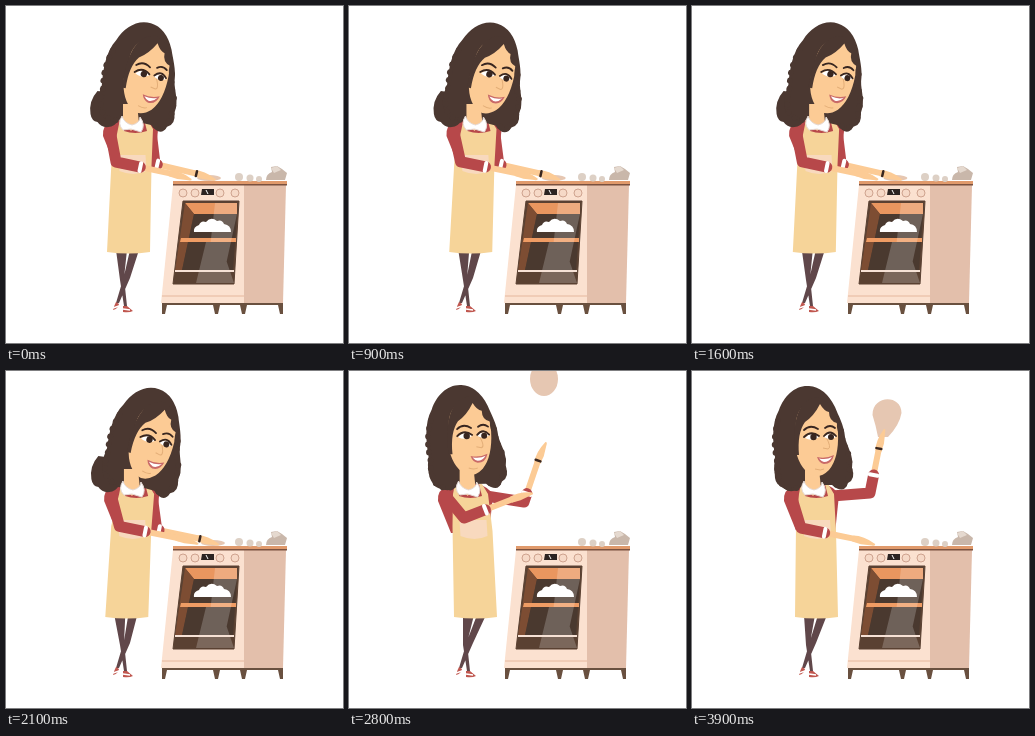
Recreate the animation shown at these times as an HTML page. Size 337x337 px, loop 4 s.

```html
<!DOCTYPE html>
<html lang="en">
<head>
<meta charset="utf-8">
<title>Baker</title>
<style>
  html, body { margin: 0; width: 100%; height: 100%; overflow: hidden; background: #fff; }
  svg { display: block; width: 100vw; height: 100vh; }
  .line { fill: none; stroke-linecap: round; stroke-linejoin: round; }
  .hair { fill: #4b3831; }
  .curl { fill: none; stroke: #4b3831; stroke-width: 6; stroke-linecap: round; stroke-dasharray: 0 8; }
  .skin { fill: #fccb95; }
  .red { fill: #b7484a; }
</style>
</head>
<body>
<svg viewBox="0 0 337 337">
  <g id="oven">
    <path fill="#69503f" d="M156 296H277V308H274L272 299H241L239 308H236L234 299H214L212 308H209L207 299H161L159 308H156Z"/>
    <path fill="#fbe1d0" d="M167 179H238V297H155Z"/>
    <path fill="#e3bfab" d="M238 179H280L277 297H238Z"/>
    <path fill="#e09a6c" d="M167 175H281V178.5H167Z"/>
    <path fill="#7a513f" d="M167 178H281V179.5H167Z"/>
    <path stroke="#e5b79d" d="M156 290H238"/>
    <g fill="#f6d9c7" stroke="#cfa38f">
      <circle cx="177" cy="187" r="4"/><circle cx="189" cy="187" r="4"/>
      <circle cx="214" cy="187" r="4"/><circle cx="229" cy="187" r="4"/>
    </g>
    <path fill="#2c2422" d="M196 183H208V189H195Z"/>
    <path stroke="#fff" d="M200 184L202 188"/>
    <path fill="#5a4132" stroke="#5a4132" d="M177 195H233L228 278H167Z"/>
    <path fill="#e9965f" d="M179 197H231V208H188Z"/>
    <path fill="#7d4d33" d="M179 197L188 208L176 265H169Z"/>
    <path fill="#4a392f" d="M188 208H231L227 264H176Z"/>
    <path fill="#ef9c64" d="M175 232H230V236H174Z"/>
    <path fill="#fff" d="M188 226Q187 221 193 219Q195 214 200 216Q205 210 211 215Q216 213 218 218Q225 219 225 226Z"/>
    <path fill="#fff" opacity=".2" d="M200 236H214L228 277H190ZM209 197H231V208L216 277H200Z"/>
    <path stroke="#f6e1d5" stroke-width="2" d="M169 265H228"/>
    <g fill="#ddd0c5">
      <circle cx="233" cy="171" r="4"/><circle cx="244" cy="172" r="3.5"/><circle cx="253" cy="173" r="3"/>
      <path fill="#c9b7aa" d="M260 174Q260 168 266 166L265 161L271 160L276 163L281 167L279 174Z"/>
      <path fill="#e5d9cf" d="M265 162L271 160L275 164L268 167Z"/>
    </g>
  </g>

  <path id="legs" fill="#60474a"/>
  <path fill="#c0574f" d="M110 296L113 298Q112 303 107 304Q108 300 110 296ZM117 300H121L127 305Q123 307 117 306Z"/>
  <path stroke="#fff" stroke-width="1.5" d="M107 302L113 300M117 303L124 304"/>

  <path id="dough" fill="#e6c7b2"/>
  <g id="rightArm"></g>
  <g id="chest">
    <path class="red" d="M101 115Q91 119 92 130L105 162H143L147 124Q143 116 130 112Z"/>
  </g>
  <path id="apron" fill="#f6d499"/>
  <path id="pocket" fill="#f8d9be"/>
  <g id="leftArm"></g>

  <path id="lock" class="hair" d="M90 84Q81 94 83 107Q84 114 90 115Q94 121 101 120Q107 120 111 113L118 88Z"/>
  <g id="hair">
    <path class="hair" d="M117 15C103 14 92 25 87 39C79 53 81 72 83 86Q80 104 88 115Q99 124 111 114L140 114Q152 124 156 112Q164 108 160 97C162 84 155 76 153 66C152 54 146 44 143 36Q133 16 117 15Z"/>
    <path class="curl" d="M86 50Q80 70 85 88Q84 104 90 113Q98 120 108 116M149 60Q150 72 156 82Q160 100 154 112Q149 116 143 113"/>
  </g>
  <g id="collar">
    <path class="skin" d="M113 98H127L129 117L121 125L113 117Z"/>
    <path fill="#fff" stroke="#e6dad5" d="M112 110Q107 118 113 124L121 123L131 126Q136 119 130 111Q130 117 122 119Q114 117 112 110Z"/>
  </g>
  <g id="face">
    <path class="skin" d="M104 50Q107 30 127 30Q145 36 146 62Q147 87 137 99Q128 108 119 104Q106 96 103 75Z"/>
    <path fill="none" stroke="#e3ae78" d="M134 66Q140 77 136 78L131 77M123 98Q129 100 132 98"/>
    <path class="hair" d="M103 84Q98 28 126 26Q148 34 150 66Q144 60 145 52Q137 50 137 41Q132 40 128 33Q122 45 113 51Q105 62 107 84Z"/>
    <g fill="#fff">
      <path d="M113 67Q120 59 127 66Q120 71 113 67ZM132 66Q138 59 144 66Q138 70 132 66Z"/>
    </g>
    <g fill="#382620">
      <circle cx="121.5" cy="66" r="3.2"/><circle cx="139" cy="66" r="3"/>
    </g>
    <path class="line" stroke="#382620" stroke-width="1.8" d="M112 66Q119 59 127 65M132 65Q138 58 144 65M112 59Q118 53 126 58M133 57Q138 53 143 57"/>
    <path fill="#c96a68" d="M125 86Q134 88 142 84Q140 93 132 93Q127 92 125 86Z"/>
    <path fill="#fff" d="M127 87.5Q135 89 140 86Q137 91 132 91Q129 90 127 87.5Z"/>
  </g>
</svg>
<script>
const $ = id => document.getElementById(id);
const LOOP = 4000, STEP = 100, TAU = Math.PI * 2;

// head x, y, tilt | chest, hem | left elbow, hand | right elbow, hand | right cuff
const back   = [6, 1, 13,   5, -2,  110, 156, 186, 172,  149, 158, 205, 171, .04];
const press  = [12, 1, 18,  7, -5,  116, 155, 200, 171,  152, 159, 212, 171, .04];
const windUp = [-5, 1, -3, -5, 1,   94, 152, 166, 122,   166, 146, 190, 98, .25];
const toss   = [-3, -1, -1, -3, 2,  115, 147, 182, 121,  175, 131, 194, 75, .15];
const hold   = [0, 0, 0,    0, 0,   109, 157, 183, 172,  178, 122, 190, 52, .3];

const mix = (a, b, k) => a.map((v, i) => v + (b[i] - v) * k);
const ease = k => k * k * (3 - 2 * k);

function along(keys, t, curve = ease) {
  let i = 1;
  while (i < keys.length - 1 && t > keys[i][0]) i++;
  const [t0, a] = keys[i - 1], [t1, b] = keys[i];
  return mix(a, b, curve(Math.min(1, Math.max(0, (t - t0) / (t1 - t0)))));
}

const tossKeys = [[2310, back], [2600, windUp], [2800, toss], [3000, hold]];
// x, y, width, height
const doughKeys = [
  [2310, [205, 172, 12, 3]], [2600, [187, 95, 14, 13]], [2700, [194, 50, 14, 16]],
  [2800, [195, 8, 14, 17]], [2900, [195, -12, 15, 16]], [3000, [195, 27, 16, 16]]
];

function poseAt(t) {
  if (t < 2310) return mix(back, press, .5 - .5 * Math.cos(TAU * t / 770));
  const pose = along(tossKeys, t);
  if (t >= 3000) pose[12] += bob(t) * 10;
  return pose;
}

const bob = t => .5 - .5 * Math.cos(TAU * (t - 3200) * 3 / 1400);

const stroke = (d, color, width) =>
  `<path class="line" d="${d}" stroke="${color}" stroke-width="${width}"/>`;

function arm(sx, sy, ex, ey, hx, hy, cuff, bracelet) {
  const at = k => [ex + (hx - ex) * k, ey + (hy - ey) * k];
  const c = at(cuff), wrist = at(.74), angle = Math.atan2(hy - ey, hx - ex);
  const band = (p, r) => {
    const dx = -Math.sin(angle) * r, dy = Math.cos(angle) * r;
    return `M${p[0] - dx} ${p[1] - dy}L${p[0] + dx} ${p[1] + dy}`;
  };
  const turn = angle * 180 / Math.PI;
  return stroke(`M${c}L${wrist}`, '#fccb95', 6)
    + `<path class="skin" transform="translate(${wrist})rotate(${turn})" d="M-3 -3Q7 -5 20 1Q21 3 17 3L6 4L-3 3Z"/>`
    + stroke(`M${sx} ${sy}L${ex} ${ey}L${c}`, '#b7484a', 11)
    + stroke(band(c, 4), '#fff', 4)
    + (bracelet ? stroke(band(wrist, 2.5), '#382620', 2.5) : '');
}

function doughPath(t, hand) {
  let [x, y, w, h] = along(doughKeys, t, k => k);
  if (t < 2310) x = hand[0] - 2;
  if (t < 3000) return `M${x - w} ${y}a${w} ${h} 0 1 0 ${2 * w} 0a${w} ${h} 0 1 0 ${-2 * w} 0Z`;
  const k = bob(t), [hx, hy] = hand;
  const r = 18 - 3.5 * k, cy = hy - 23 + 3 * k, lean = 7 * (1 - k), base = hy - 4 + 8 * k;
  return `M${hx - 4} ${base}Q${hx - 6} ${cy + 13} ${195 - r} ${cy + 2}`
    + `C${195 - r} ${cy - r - 4} ${195 + r - lean} ${cy - r - 4} ${195 + r} ${cy + lean / 3}`
    + `Q${195 + r - 2} ${cy + 12} ${hx + 6} ${base}Z`;
}

function draw(t) {
  const [hx, hy, tilt, chest, hem, lex, ley, lhx, lhy, rex, rey, rhx, rhy, cuff] = poseAt(t);
  const waist = chest * .5 + hem * .5;
  const set = (id, name, value) => $(id).setAttribute(name, value);

  set('legs', 'd', `M${112 + hem} 244h11L118 272L121 300H118L114 274Z`
    + `M${126 + hem} 244h9L124 272L113 297H110L118 270Z`);
  set('chest', 'transform', `translate(${chest})`);
  set('apron', 'd', `M${107 + chest} 123L${109 + chest} 113h3L${113 + chest} 125Q${124 + chest} 129 ${136 + chest} 125`
    + `L${133 + chest} 113h3L${142 + chest} 123L${144 + waist} 160L${146 + hem} 246Q${125 + hem} 249 ${103 + hem} 246L${104 + waist} 155Z`);
  set('pocket', 'd', `M${111 + waist} 149h27l1 16q-13 6 -27 0Z`);
  $('rightArm').innerHTML = arm(140 + chest, 125, rex, rey, rhx, rhy, cuff, true);
  $('leftArm').innerHTML = arm(99 + chest, 124, lex, ley, lhx, lhy, .32, false);
  set('dough', 'd', doughPath(t, [rhx, rhy]));

  const turn = `translate(${hx} ${hy})rotate(${tilt} 122 112)`;
  set('lock', 'transform', `translate(${hx * .25} ${hy})`);
  set('hair', 'transform', turn);
  set('face', 'transform', turn);
  set('collar', 'transform', `translate(${chest * .8})`);
}

function tick() {
  draw(Math.floor(performance.now() % LOOP / STEP) * STEP);
  requestAnimationFrame(tick);
}
tick();
</script>
</body>
</html>
```
